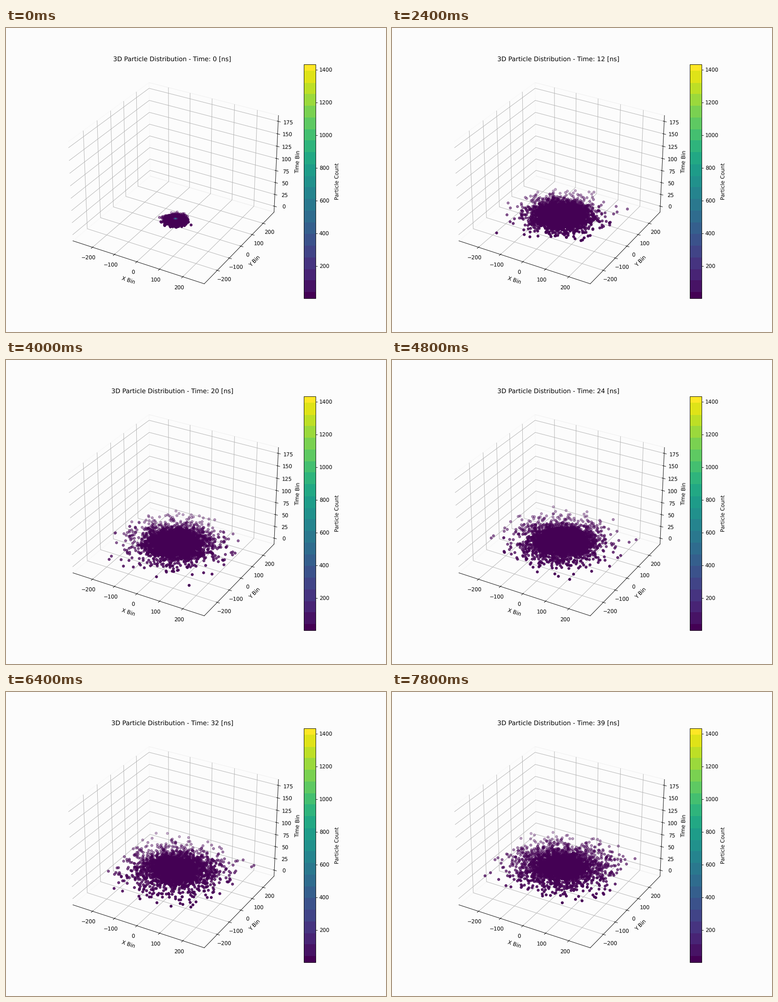
A matplotlib script for the animation above (8 s loop, 837 by 669 pixels).

```python
import numpy as np
import matplotlib.pyplot as plt
from matplotlib.animation import FuncAnimation
from matplotlib.cm import ScalarMappable
from matplotlib.colors import ListedColormap, Normalize

W, H, DPI = 837, 669, 83.7
FRAMES, STEP_MS = 40, 200
PEAK, BANDS = 1433, 20
PAPER = "#fcfcfc"
X_MAX, Y_MIN, Y_MAX, T_MAX = 254, -267, 264, 174

plt.rcParams["text.hinting"] = "none"


def rise(t, tau):
    """Ease from 0 towards 1 with time constant tau."""
    return 1 - np.exp(-t / tau)


def cloud(t):
    """Hit bins and their counts at time t: a dense core and a wide halo."""
    rng = np.random.default_rng(100 + t)
    core_n = int(4000 * np.exp(-(t / 42) ** 2))
    core_sigma = 16.5 + 36 * rise(t, 6) - 0.2 * t
    halo_n = int(150 + 1600 * rise(t, 14))
    halo_sigma = 16 + 78 * rise(t, 9)

    xy = np.vstack([rng.normal(0, core_sigma, (core_n, 2)),
                    rng.normal(0, halo_sigma, (halo_n, 2))])
    x, y = np.unique(np.rint(xy), axis=0).T
    inside = (abs(x) <= X_MAX) & (y >= Y_MIN) & (y <= Y_MAX)
    x, y = x[inside], y[inside]
    count = 1 + (PEAK - 1) * np.exp(-1.2 * t - np.hypot(x, y) / 3)
    return x, y, count


def padded(lo, hi):
    """Limits with a 5 % data margin and the 1/48 box margin."""
    mid, half = (lo + hi) / 2, (hi - lo) / 2 * 1.1 * 25 / 24
    return mid - half, mid + half


fig = plt.figure(figsize=(W / DPI + 1e-6, H / DPI + 1e-6), dpi=DPI, facecolor=PAPER)
ax = fig.add_subplot(projection="3d", facecolor=PAPER)

levels = np.round(np.linspace(0, BANDS, 256)) / BANDS
cmap = ListedColormap(plt.get_cmap("viridis")(levels))
norm = Normalize(1, PEAK)
fig.colorbar(ScalarMappable(norm, cmap), ax=ax, label="Particle Count")

ax.set(xlabel="X Bin", ylabel="Y Bin", zlabel="Time Bin",
       xticks=range(-200, 201, 100), yticks=range(-200, 201, 100),
       zticks=range(0, 176, 25))
ax.set(xlim=padded(-X_MAX, X_MAX), ylim=padded(Y_MIN, Y_MAX), zlim=padded(0, T_MAX))
ax.set_autoscale_on(False)
for axis in (ax.xaxis, ax.yaxis, ax.zaxis):
    axis.pane.set_fill(False)


def update(t):
    for old in list(ax.collections):
        old.remove()
    x, y, count = cloud(t)
    ax.scatter(x, y, np.full_like(x, t), c=count, cmap=cmap, norm=norm)
    ax.set_title(f"3D Particle Distribution - Time: {t} [ns]")
    return ax.collections


anim = FuncAnimation(fig, update, frames=FRAMES, init_func=lambda: update(0),
                     interval=STEP_MS, repeat=True, repeat_delay=0, blit=False)
plt.show()
```
